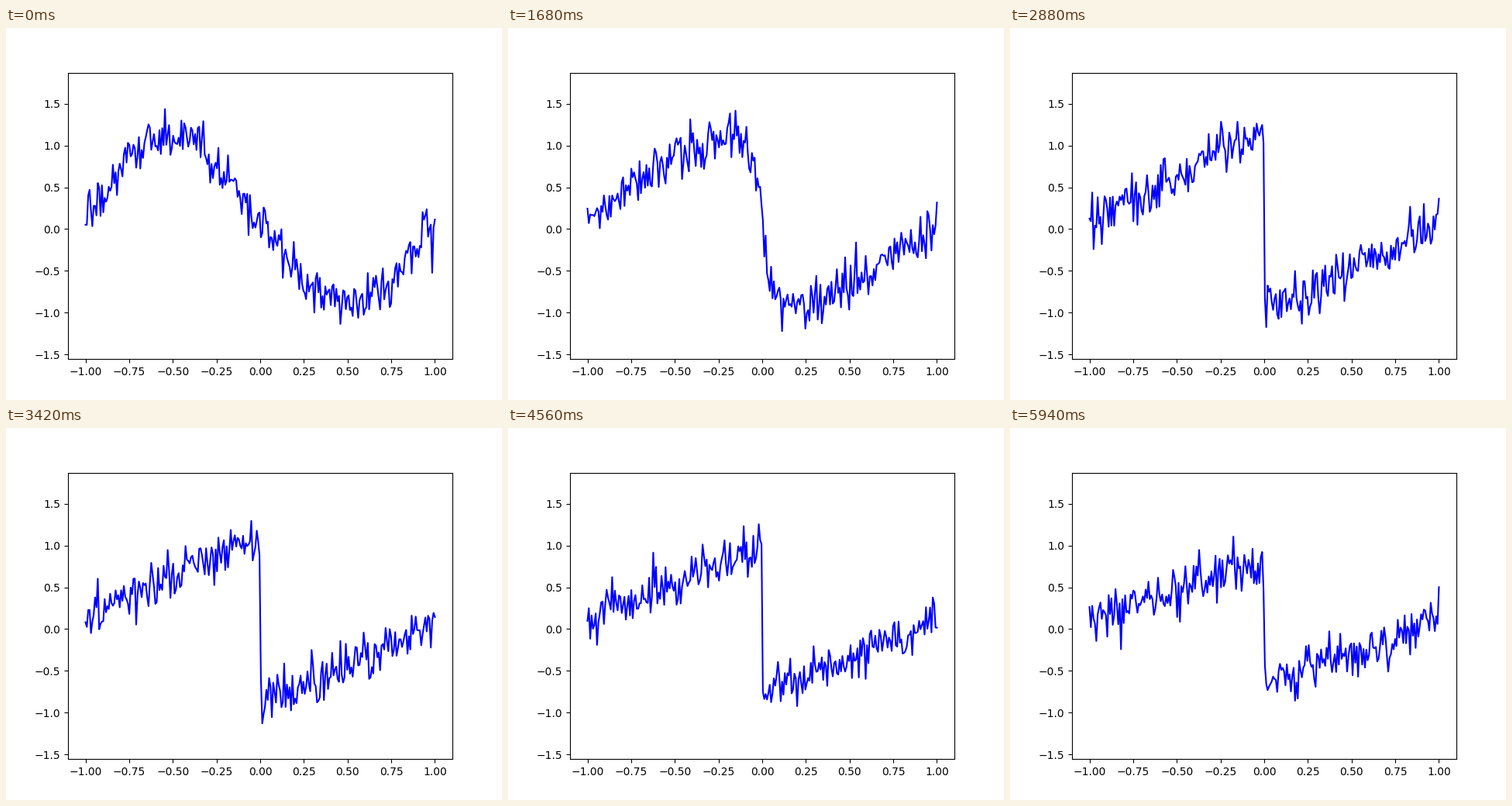
Write a matplotlib script that moves like this. It is 640 px wide and 480 px high and loops after 6 s.

```python
import numpy as np
import matplotlib.pyplot as plt
from matplotlib.animation import FuncAnimation

FRAMES = 100
INTERVAL = 60
POINTS = 256
END_TIME = 1.03
VISCOSITY = 0.005 / np.pi
NOISE_MEAN = 0.1
NOISE_STD = 0.15

x = np.linspace(-1, 1, POINTS)
times = np.linspace(0, END_TIME, FRAMES)

# Quadrature grid for the Cole-Hopf integral
shift = np.linspace(-1.3, 1.3, 1041)
source = x[:, None] - shift
start = -np.sin(np.pi * source)
potential = np.cos(np.pi * source) / (2 * np.pi * VISCOSITY)


def burgers(t):
    """Solution of Burgers' equation that starts as -sin(pi x)."""
    if t == 0:
        return -np.sin(np.pi * x)
    power = -potential - shift**2 / (4 * VISCOSITY * t)
    weight = np.exp(power - power.max(axis=1, keepdims=True))
    return (start * weight).sum(axis=1) / weight.sum(axis=1)


rng = np.random.default_rng(1000)
noise = rng.normal(NOISE_MEAN, NOISE_STD, (FRAMES, POINTS))
signal = np.array([burgers(t) for t in times]) + noise

fig, ax = plt.subplots(figsize=(6.4, 4.8), dpi=100)
line, = ax.plot(x, signal[0], color="b", lw=1.5)
ax.set_xlim(-1.1, 1.1)
ax.set_ylim(-1.5543, 1.8707)


def update(step):
    line.set_ydata(signal[step])
    return line,


anim = FuncAnimation(fig, update, frames=FRAMES, interval=INTERVAL,
                     repeat=True, repeat_delay=0)
plt.show()
```
